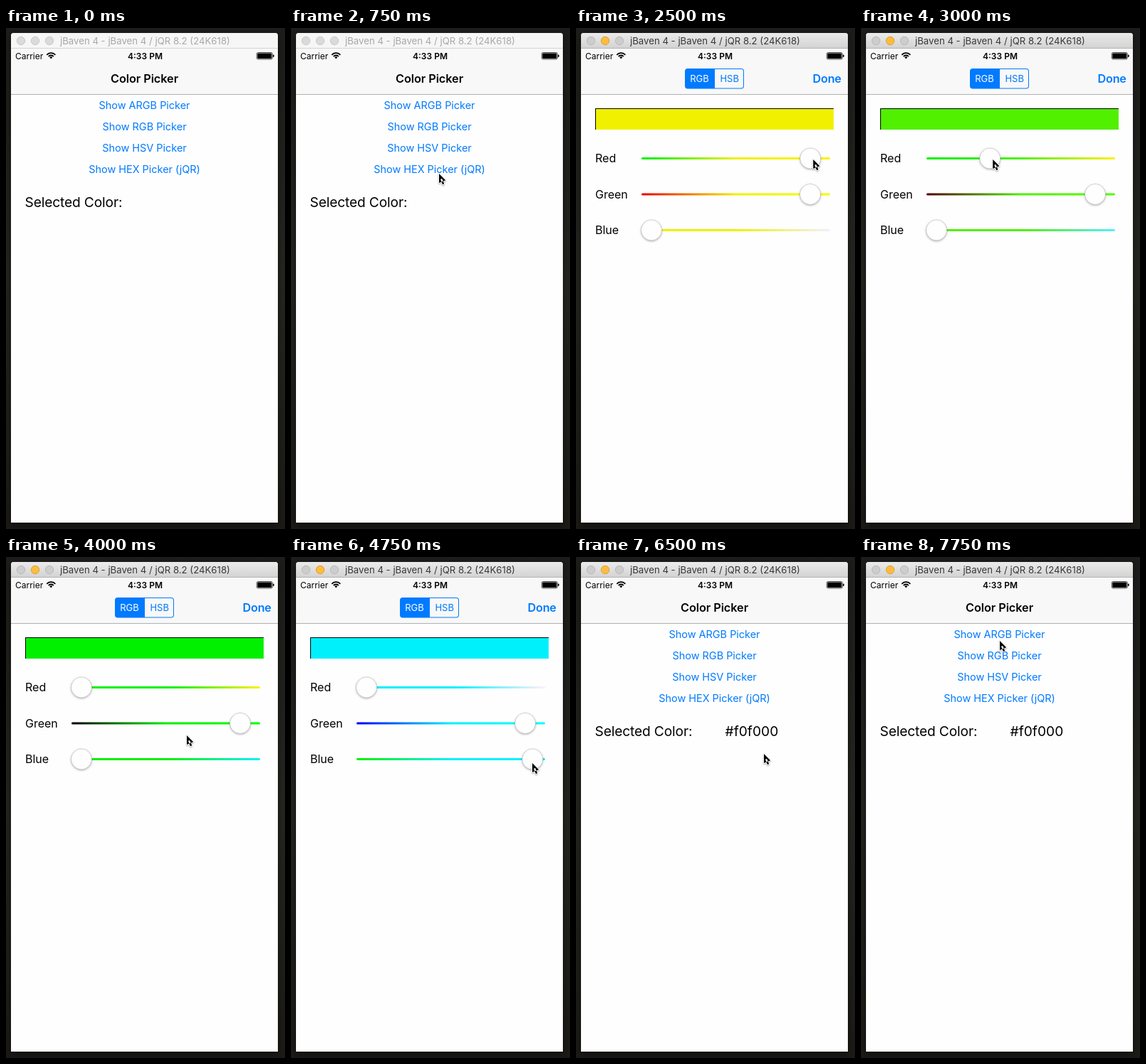
Recreate the animation shown at these times as an HTML page with a canvas. Size 392 by 705 pixels, loop 8000 ms.

```html
<!DOCTYPE html>
<html lang="en">
<head>
<meta charset="utf-8">
<title>Color Picker</title>
<style>
html, body { margin: 0; width: 100%; height: 100%; overflow: hidden; background: #1e1f1a; }
canvas { display: block; width: 392px; height: 705px; }
</style>
</head>
<body>
<canvas id="stage" width="392" height="705"></canvas>
<script>
const ctx = document.getElementById('stage').getContext('2d');
const W = 392, H = 705, LOOP = 8000, STEP = 250;
const LEFT = 7, TOP = 28, WIDTH = 375, HEIGHT = 668, MID = LEFT + WIDTH / 2;
const BLUE = '#007aff', PAPER = '#fefefe', BAR = '#f8f8f8';
const OPEN = 1140, CLOSE = 5870;

// pointer moves: begin, end, x, y
const MOVES = [
  [250, 750, 208, 205],
  [1500, 2250, 347, 185],
  [2250, 3500, 110, 185],
  [3500, 4000, 254, 251],
  [4000, 4250, 106, 290],
  [4250, 4750, 339, 290],
  [4750, 5500, 337, 84],
  [6000, 6500, 264, 277],
  [6750, 7750, 195, 118]
];

function ease(t, from, to) {
  const p = Math.min(1, Math.max(0, (t - from) / (to - from)));
  return p * p * p * (p * (6 * p - 15) + 10);
}

// remaining share of a critically damped spring
function spring(ms) {
  const w = Math.max(0, ms) * 0.0125;
  return (1 + w) * Math.exp(-w);
}

function sheetOffset(t) {
  const share = t < CLOSE ? spring(t - OPEN) : 1 - spring(t - CLOSE);
  return share < 0.006 ? 0 : Math.round(667 * share);
}

function pointerAt(t) {
  let x = 228, y = 150;
  for (const [from, to, tx, ty] of MOVES) {
    const p = ease(t, from, to);
    x += (tx - x) * p;
    y += (ty - y) * p;
  }
  return [x, y];
}

function colorAt(t) {
  return [255 * (1 - ease(t, 2250, 3500)), 240, 251 * ease(t, 4250, 4750)];
}

const rgb = c => `rgb(${c.map(Math.round).join(',')})`;

function rect(x, y, w, h, fill) {
  ctx.fillStyle = fill;
  ctx.fillRect(x, y, w, h);
}

function round(x, y, w, h, r, fill) {
  ctx.beginPath();
  ctx.roundRect(x, y, w, h, r);
  ctx.fillStyle = fill;
  ctx.fill();
}

function disc(x, y, r, fill, line) {
  ctx.beginPath();
  ctx.arc(x, y, r, 0, Math.PI * 2);
  ctx.fillStyle = fill;
  ctx.fill();
  if (line) {
    ctx.strokeStyle = line;
    ctx.lineWidth = 1;
    ctx.stroke();
  }
}

function text(str, x, y, size, { weight = 400, gap = 0, align = 'left', color = '#000' } = {}) {
  ctx.font = `${weight} ${size}px Inter, Roboto, sans-serif`;
  ctx.letterSpacing = gap + 'px';
  ctx.textAlign = align;
  ctx.fillStyle = color;
  ctx.fillText(str, x, y);
}

function gradient(x0, y0, x1, y1, colors) {
  const g = ctx.createLinearGradient(x0, y0, x1, y1);
  colors.forEach((c, i) => g.addColorStop(i / (colors.length - 1), c));
  return g;
}

function shadow(alpha, blur, dy) {
  ctx.shadowColor = `rgba(0,0,0,${alpha})`;
  ctx.shadowBlur = blur;
  ctx.shadowOffsetY = dy;
}

function backdrop() {
  rect(0, 0, W, H, gradient(0, 0, 0, H, ['#1c1d1a', '#24251f', '#1b1a16']));
  ctx.save();
  shadow(0.5, 10, 4);
  round(LEFT, 7, WIDTH, 689, [4, 4, 0, 0], PAPER);
  ctx.restore();
}

function titleBar(active) {
  const fill = active ? gradient(0, 7, 0, TOP, ['#ebebeb', '#d3d3d3']) : '#f6f6f6';
  round(LEFT, 7, WIDTH, 21, [4, 4, 0, 0], fill);
  rect(LEFT, TOP, WIDTH, 1, active ? '#b3b3b3' : '#d4d4d4');
  for (let i = 0; i < 3; i++) {
    const lit = active && i === 1;
    disc(21 + i * 20, 18, 5.7, lit ? '#fdbc40' : active ? '#cdcdcd' : '#dadada',
      lit ? '#e0a030' : active ? '#b9b9b9' : '#c9c9c9');
  }
  text('jBaven 4 - jBaven 4 / jQR 8.2 (24K618)', 76, 23, 13.2,
    { color: active ? '#383838' : '#a8a8a8' });
}

function wifi(x, y) {
  ctx.strokeStyle = '#000';
  for (let i = 0; i < 3; i++) {
    ctx.lineWidth = i ? 1.8 : 2.6;
    ctx.beginPath();
    ctx.arc(x, y, 1.4 + i * 3.3, -Math.PI * 0.77, -Math.PI * 0.23);
    ctx.stroke();
  }
}

function battery(x, y) {
  ctx.lineWidth = 0.7;
  ctx.strokeStyle = '#000';
  ctx.beginPath();
  ctx.roundRect(x, y, 22, 9.5, 2);
  ctx.stroke();
  round(x + 1, y + 1, 20, 7.5, 1, '#000');
  round(x + 22.7, y + 3, 1.6, 3.5, 0.8, '#000');
}

function statusBar() {
  text('Carrier', 13, 44, 12);
  text('4:33 PM', 195.5, 44, 12, { weight: 600, align: 'center' });
  wifi(63.3, 43.2);
  battery(352.3, 34.5);
}

function page() {
  rect(LEFT, TOP, WIDTH, HEIGHT, PAPER);
  rect(LEFT, TOP, WIDTH, 65, BAR);
  rect(LEFT, 93, WIDTH, 1, '#b2b2b2');
}

function listPage(hex) {
  page();
  text('Color Picker', MID, 77, 16.3, { weight: 600, align: 'center', gap: -0.07 });
  ['ARGB Picker', 'RGB Picker', 'HSV Picker', 'HEX Picker (jQR)'].forEach((s, i) =>
    text(`Show ${s}`, MID, 113.5 + i * 30, 14.5, { color: BLUE, align: 'center', gap: -0.03 }));
  text('Selected Color:', 26.5, 252, 19.2, { gap: -0.15 });
  text(hex, 209.5, 252, 19.2);
}

function slider(label, y, color, channel) {
  const low = color.with(channel, 0), high = color.with(channel, 255);
  text(label, 27, y + 5.7, 16);
  round(92, y - 1.5, 265, 3, 1.5, gradient(92, 0, 357, 0, [low, color, high].map(rgb)));
  const x = 106 + 237 * color[channel] / 255;
  ctx.save();
  shadow(0.25, 3, 1);
  disc(x, y, 14.3, PAPER, '#c6c6c6');
  ctx.restore();
  disc(x, y, 13.9, PAPER);
}

function segments() {
  round(153, 57, 83, 28.5, 4, BLUE);
  round(195, 58, 40, 26.5, [0, 3, 3, 0], BAR);
  text('RGB', 173.5, 75.7, 13, { color: '#fff', align: 'center' });
  text('HSB', 215.7, 75.7, 13, { color: BLUE, align: 'center' });
}

function sheet(offset, color) {
  ctx.save();
  ctx.beginPath();
  ctx.rect(LEFT, TOP, WIDTH, HEIGHT);
  ctx.clip();
  ctx.translate(0, offset);
  page();
  segments();
  text('Done', 332.5, 77, 16.2, { weight: 600, color: BLUE, gap: -0.2 });
  rect(27, 113, 335, 30, '#000');
  rect(28, 114, 334, 29, rgb(color));
  ['Red', 'Green', 'Blue'].forEach((s, i) => slider(s, 183.5 + i * 50.5, color, i));
  ctx.restore();
}

// arrow head plus a tilted stem
const arrow = new Path2D('M0 0V13L9.2 9.2Z');
const stem = new Path2D();
stem.rect(-1.2, 8, 2.4, 8);
arrow.addPath(stem, new DOMMatrix().rotate(-22.5));

function pointer(x, y) {
  ctx.save();
  ctx.translate(x, y);
  ctx.lineJoin = 'round';
  ctx.lineWidth = 2;
  ctx.strokeStyle = '#fff';
  shadow(0.35, 2, 1);
  ctx.stroke(arrow);
  ctx.shadowColor = 'transparent';
  ctx.fillStyle = '#000';
  ctx.fill(arrow);
  ctx.restore();
}

function draw(t) {
  const active = t >= 1250, offset = sheetOffset(t);
  backdrop();
  listPage(t >= 1750 ? '#f0f000' : '');
  if (active && offset < 660) sheet(offset, colorAt(t));
  titleBar(active);
  statusBar();
  if (t >= 250) pointer(...pointerAt(t));
}

// The screen refreshes four times a second.
const start = performance.now();
function tick() {
  const t = (performance.now() - start) % LOOP;
  draw(Math.floor(t / STEP) * STEP);
  requestAnimationFrame(tick);
}
tick();
</script>
</body>
</html>
```
